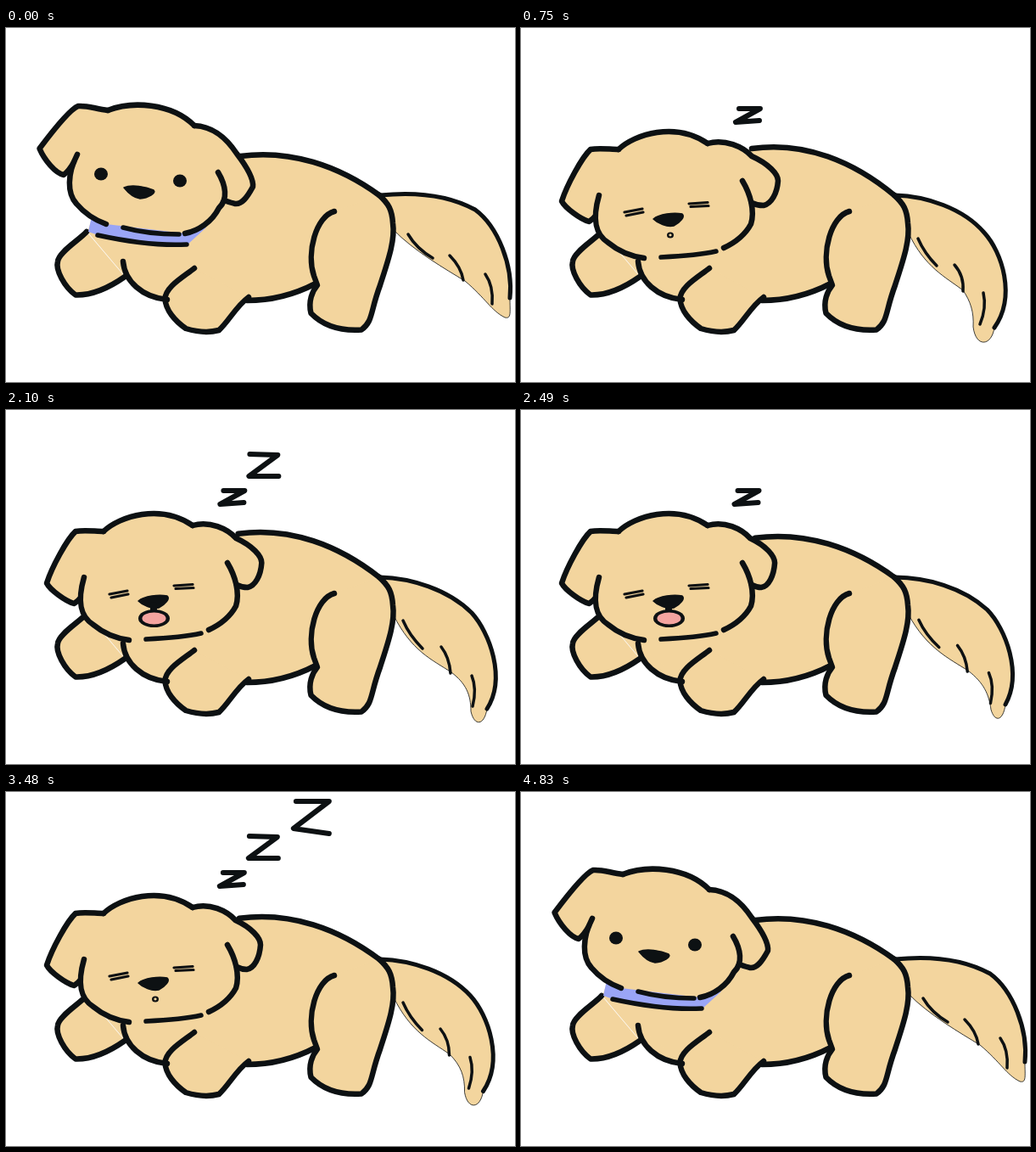
An HTML page with a canvas that plays this animation: 600x417 px, repeating every 4950 ms.

```html
<!DOCTYPE html>
<html lang="en">
<head>
<meta charset="utf-8">
<title>Sleepy puppy</title>
<style>
  html, body { margin: 0; height: 100%; overflow: hidden; background: #fff; }
  canvas { display: block; }
</style>
</head>
<body>
<canvas id="stage" width="600" height="417"></canvas>
<script>
const ctx = document.getElementById('stage').getContext('2d');
const INK = '#0d1113', FUR = '#f3d59e', COLLAR = '#9aa5f6', PINK = '#f4a4a0';

// Blend two path strings that share the same commands.
function mix(a, b, t) {
  const to = b.match(/-?[\d.]+/g);
  let i = 0;
  return a.replace(/-?[\d.]+/g, n => (+n + (to[i++] - n) * t).toFixed(2));
}
const lerp = (a, b, t) => a + (b - a) * t;

function fill(d, color = FUR) {
  ctx.fillStyle = color;
  ctx.fill(new Path2D(d));
}
function line(d, width = 6.5) {
  ctx.strokeStyle = INK;
  ctx.lineWidth = width;
  ctx.stroke(new Path2D(d));
}
function oval(x, y, rx, ry, color) {
  ctx.beginPath();
  ctx.ellipse(x, y, rx, ry, 0, 0, 7);
  ctx.fillStyle = color;
  ctx.fill();
}

// Tail poses: raised, half lowered, lowered.
const tailTop = [
  'M441 197C480 193 520 196 553 214C580 234 598 280 594 318',
  'M441 197C477 198 521 211 549 239C570 262 590 316 567 352',
  'M441 197C477 198 521 212 546 241C567 264 584 316 558 353'];
const tailTip = [
  'M594 318C594 335 596 343 588 341C572 333 565 318 541 298C518 284 480 262 457 238',
  'M567 352C564 372 552 373 548 355C548 335 542 322 525 309C502 294 478 284 457 242',
  'M558 353C555 375 536 377 533 352C534 335 530 322 521 309C500 293 476 282 457 242'];
const tailHair = [
  'M474 243C481 255 491 264 503 271M523 268C531 276 537 285 539 297M565 290C572 300 574 313 573 325',
  'M468 248C474 262 482 272 491 281M513 279C520 288 523 297 524 310M549 313C554 325 553 337 550 349',
  'M468 248C474 262 482 272 490 280M511 279C518 287 522 298 521 310M545 312C548 325 546 337 541 349'];

const paw = 'M95 240C86 250 62 264 61 275C58 285 69 305 82 314.500C100 315 120 307 140 293';
const chest = 'M138 275C140 298 160 317 190 320';
const foreleg = 'M222 283C208 294 188 305 187.500 319C188 332 199 345 212 354C225 358 240 359 251 356C263 345 271 328 286 317';
const belly = 'M284 321C311 321 340 314 365 301';
const hindLeg = 'M387 216C365 222 354 265 363 292L367 303C361 310 356 322 359.500 336' +
  'C374 351 395 357 419 355.500C433 345 429 335 441 303C450 275 459 250 456 230C455 214 451 207 440 197';
const back = [
  'M276 151C335 143 392 162 440 197',
  'M272 142C335 133 393 158 440 197'];

// Head parts run clockwise: awake, asleep.
const crown = ['M120 97C148 86 195 88 222 115', 'M115 143C134 125 182 110 220 136'];
const earR = [
  'M222 115C245 116 260 130 272 148C285 165 292 178 291 187C284 200 278 208 270 207C265 206 260 204 257 203',
  'M220 136C240 130 260 140 270 151C289 160 299 172 299 180C298 195 292 208 283 209C279 209 274 207 272 206',
  'M220 136C240 130 262 140 272 151C292 160 303 172 303 180C302 195 295 207 286 209C280 209 274 207 272 206'];
const faceR = [
  'M250 170C259 185 262 202 251 212C243 228 227 239 211 242',
  'M261 180C270 195 276 215 271 231C264 244 252 253 239 259'];
const faceL = [
  'M118 231C107 227 94 220 83 207C72 195 72 172 84 149',
  'M145 271C130 269 115 263 103 253C87 243 84 225 92 197'];
const earL = [
  'M80 158C76 165 72 170 68 173C58 171 45 155 39.500 142C50 128 75 96 85 92C95 91 105 95 120 97',
  'M87 222C85 225 83 226 80 228C70 225 52 212 48 204C54 185 72 152 82 143C92 141 105 143 115 143'];
const chin = ['M138 235C160 241 185 243 204 243', 'M165 270C185 269 212 267 230 263'];
const nose = [
  'M139 188C148 184 165 187 174 191C178 194 168 200 158 201C150 200 143 193 139 188Z',
  'M156 225C163 219 180 217 190 219C194 222 188 229 180 233C172 235 161 230 156 225Z'];
const snores = [
  'M257 95L282 95L253 111L281 109',
  'M288 52L321 53L287 78L322 78',
  'M343 11L382 11L340 43L382 49'];

// Per-step poses for the first half; the second half runs backwards.
const headDrop = [0, 0, .1, .22, .5, .8];
const tailDrop = [0, 0, .3, .6, .72, .85, 2, 2.8, 3.4, 2.2, 1.1, 1.9, 1.5, .9, .85, .9, .95, 1, 2.1, 1.5, .85];
const snoreCount = [0, 0, 1, 2, 3, 2, 1];

function drawTail(q) {
  const pose = p => q < 1 ? mix(p[0], p[1], q) : mix(p[1], p[2], q - 1);
  const top = pose(tailTop), tip = pose(tailTip);
  fill(top + tip.replace('M', 'L'));
  line(tip, .8);
  line(top, 5);
  line(pose(tailHair), 3.5);
}

function drawBody(breath, awake) {
  const spine = mix(back[0], back[1], breath);
  fill(spine + 'L368 303C345 313 310 321 284 321L190 319C160 316 140 298 140 292L96 240L110 200Z');
  const parts = [paw, chest, foreleg, hindLeg];
  parts.forEach(d => fill(d));
  [spine, belly, ...parts].forEach(d => line(d));
  if (awake) {
    fill('M101 222L97 240C130 252 175 260 214 255L236 235L150 222Z', COLLAR);
    line('M108 244C140 251 175 257 213 255', 5.5);
  }
}

function drawHead(drop, breath, mouthOpen) {
  const pose = p => mix(p[0], p[1], drop);
  const rightEar = mix(earR[0], mix(earR[1], earR[2], breath), drop);
  const edge = [pose(crown), rightEar, pose(faceR), pose(faceL), pose(earL)];
  fill('M' + edge.join('').replace(/M/g, 'L').slice(1) + 'Z');
  edge.forEach(d => line(d));
  line(pose(chin), 5.5);

  const lx = lerp(112, 132, drop), ly = lerp(172, 216, drop);
  const rx = lerp(205, 209, drop), ry = lerp(180, 207, drop);
  if (drop < .5) {
    oval(lx, ly, 8, 7.5, INK);
    oval(rx, ry, 8, 7.5, INK);
  } else {
    line(`M${lx - 10} ${ly + 1}l21 -4m-19 8l20 -4M${rx - 11} ${ry}l22 -1.5m-20 5l21 -1`, 3.2);
  }
  fill(pose(nose), INK);
  line(pose(nose), 1.5);
  if (drop < 1) return;
  if (mouthOpen) {
    line('M174 230L174 235', 8);
    oval(174.5, 245.5, 18.5, 10.5, INK);
    oval(174.5, 245.5, 14, 7, PINK);
  } else {
    oval(176, 244, 4, 3.5, INK);
    oval(176, 244, 1.6, 1.4, FUR);
  }
}

function draw(ms) {
  const u = ms % 990;
  const beat = u < 510 ? Math.min(3, Math.floor(u / 120)) : Math.floor((u - 30) / 120);
  const k = Math.floor(ms / 990) * 8 + beat;
  const step = Math.min(k, 40 - k);

  const drop = headDrop[step] ?? 1;
  const phase = (step - 6) * 40;
  const breath = (.5 + .5 * Math.cos(phase * Math.PI / 180)) * (step < 6 ? drop : 1);
  const mouthOpen = phase % 360 > 70 && phase % 360 < 210;

  ctx.fillStyle = '#fff';
  ctx.fillRect(0, 0, 600, 417);
  drawTail(tailDrop[step]);
  drawBody(breath, drop < 1);
  drawHead(drop, breath, mouthOpen);

  ctx.save();
  ctx.translate(1.5 * (breath - 1), 0);
  snores.slice(0, snoreCount[Math.floor(step / 3)]).forEach(d => line(d, 6));
  ctx.restore();
}

ctx.lineCap = ctx.lineJoin = 'round';
const start = performance.now();
function tick() {
  draw((performance.now() - start) % 4950);
  requestAnimationFrame(tick);
}
tick();
</script>
</body>
</html>
```
